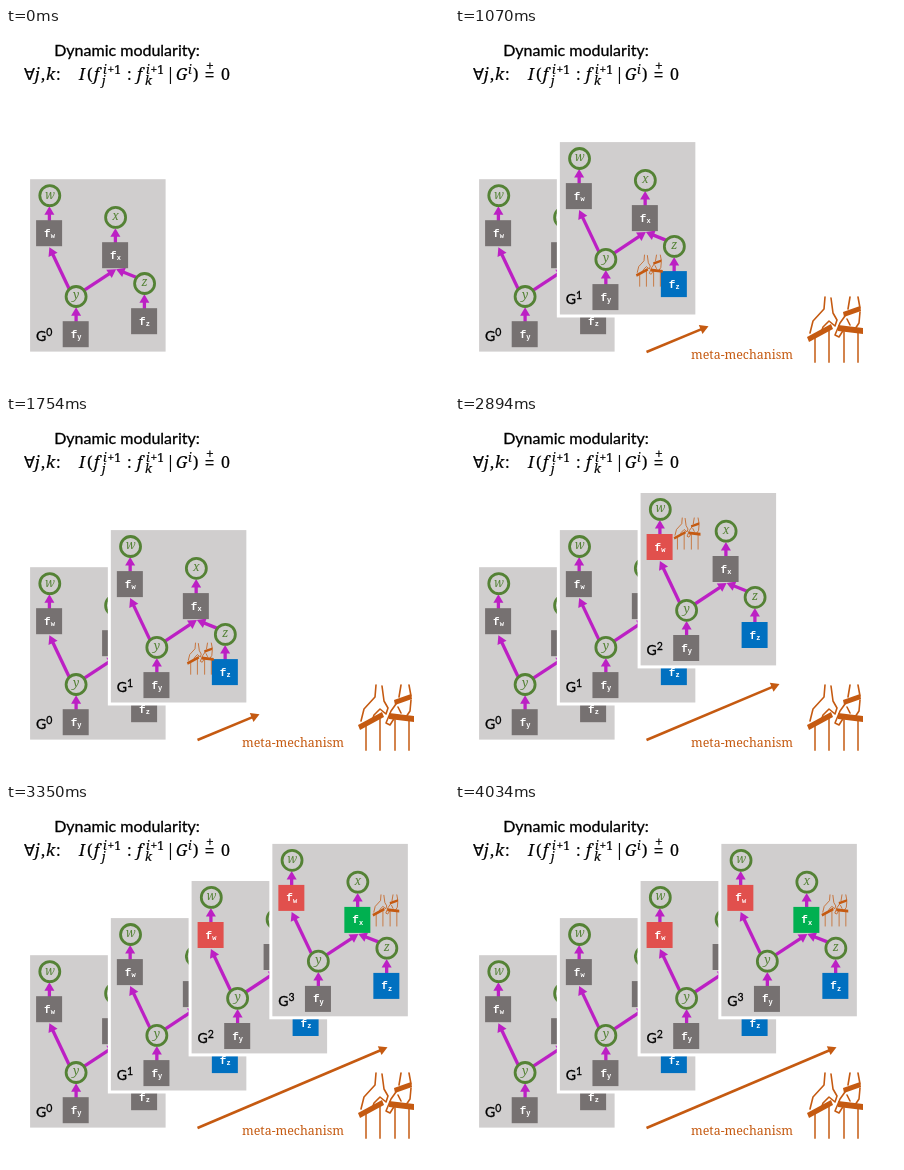
An HTML page that plays this animation: 443 by 360 pixels, repeating every 4490 ms.

```html
<!DOCTYPE html>
<html lang="en">
<head>
<meta charset="utf-8">
<title>Dynamic modularity</title>
<style>
  html, body { margin: 0; width: 100%; height: 100%; overflow: hidden; background: #fff; }
  svg { display: block; width: 100%; height: 100%; }
  .sans { font-family: Lato, "Open Sans", sans-serif; stroke: #000; stroke-width: .3px; }
  .math { font-family: "Noto Serif", "DejaVu Sans", serif; stroke: #000; stroke-width: .2px; }
  .it { font-style: italic; }
  .node { font: italic 12px "Noto Serif", serif; fill: #548235; text-anchor: middle; }
  .mono { font-family: "Liberation Mono", monospace; font-weight: bold; fill: #fff; }
  .meta { font-family: "Noto Serif", serif; font-size: 12.4px; fill: #c55a11; }
</style>
</head>
<body>
<svg id="stage" viewBox="0 0 443 360" xmlns="http://www.w3.org/2000/svg">
  <defs>
    <g id="hands" fill="none" stroke="#c55a11" stroke-width="1.6" stroke-linejoin="round" stroke-linecap="round">
      <path d="M8 43V67M22 36V67M37 37V67M51 38V67" stroke-width="2" opacity=".75"/>
      <g fill="#c55a11" stroke="none">
        <path d="M0 42L24 29L26 34L2 47Z"/>
        <path d="M31 30L56 33V39L31 36Z"/>
        <path d="M36 17L53 11L54 16L37 22Z"/>
      </g>
      <path d="M18 2L17 14L6 26L3 38M24 3L26 18L30 25L28 31L22 26L16 32L14 38"/>
      <path d="M43 2L41 14M51 2L53 13M38 21L33 28L28 40L32 42L37 34M53 17L52 28L48 34M40 24L43 30"/>
    </g>
  </defs>
  <rect width="443" height="360" fill="#fff"/>
  <text class="sans" x="121" y="28" font-size="16" text-anchor="middle">Dynamic modularity:</text>
  <g id="formula" class="math"></g>
  <g id="panels"></g>
  <g id="mechanism">
    <g id="arrow"></g>
    <text class="meta" x="236" y="330.5">meta-mechanism</text>
    <use href="#hands" x="352" y="267"/>
  </g>
</svg>
<script>
const $ = id => document.getElementById(id);
const MAGENTA = "#bc20c4", ORANGE = "#c55a11";
const GREY = "#767171", BLUE = "#0070c0", RED = "#e1504d", GREEN = "#00b050";

// Formula pieces: text, x, baseline, size, italic
const BASE = 52, SIZE = 16, SMALL = 12;
const main = (s, x, it) => [s, x, BASE, SIZE, it];
const factor = (x, sub) => [
  main("f", x, 1), ["i", x + 9, 46, SMALL, 1], ["+1", x + 13.5, 46, SMALL, 0], [sub, x + 8, 57, SMALL, 1]
];
const pieces = [
  main("∀", 18), main("j", 29, 1), main(",", 35), main("k", 40, 1), main(":", 50),
  main("I", 73, 1), main("(", 81), ...factor(88, "j"), main(":", 121), ...factor(131, "k"),
  main("|", 160), main("G", 170, 1), ["i", 182, 46, SMALL, 1], main(")", 187),
  ["=", 198.5, 53, 18, 0], ["+", 200, 43, 14, 0], main("0", 215)
];
$("formula").innerHTML = pieces.map(([s, x, y, size, it]) =>
  `<text x="${x}" y="${y}" font-size="${size}"${it ? ' class="it"' : ""}>${s}</text>`).join("");

function arrow(x1, y1, x2, y2, color, width, len, half) {
  const d = Math.hypot(x2 - x1, y2 - y1), ux = (x2 - x1) / d, uy = (y2 - y1) / d;
  const bx = x2 - ux * len, by = y2 - uy * len;
  return `<path d="M${x1} ${y1}L${bx + ux} ${by + uy}" stroke="${color}" stroke-width="${width}"/>` +
    `<path d="M${x2} ${y2}L${bx - uy * half} ${by + ux * half}L${bx + uy * half} ${by - ux * half}Z" fill="${color}"/>`;
}

// Coordinates below are relative to a panel's top left corner.
const nodes = { w: [19.7, 16.4], x: [85.5, 38.2], z: [114.5, 104.3], y: [46, 117.3] };
const boxes = { w: [6, 41], x: [72, 63], z: [101, 129], y: [32.6, 142] };
const edges = [
  [19.3, 42, 19.3, 27], [85.3, 64, 85.3, 49], [114.3, 130, 114.3, 115], [46, 143, 46, 128],
  [39, 109.5, 19.3, 68], [53.5, 111.5, 86, 90], [106, 98, 86, 90]
];
const panels = [
  { colors: {} },
  { colors: { z: BLUE }, hands: [76, 112] },
  { colors: { z: BLUE, w: RED }, hands: [33, 24] },
  { colors: { z: BLUE, w: RED, x: GREEN }, hands: [100, 50] }
];

function panel({ colors, hands }, i) {
  let s = `<g id="panel${i}" transform="translate(${24.1 + 80.75 * i} ${151.2 - 37.1 * i})">`;
  s += `<rect x="-3" y="-3" width="141.5" height="178.4" fill="#fff"/><rect width="135.5" height="172.4" fill="#d0cece"/>`;
  s += edges.map(e => arrow(...e, MAGENTA, 3.3, 8.5, 5)).join("");
  for (const k in nodes) {
    const [x, y] = nodes[k];
    s += `<circle cx="${x}" cy="${y}" r="10" fill="#d0cece" stroke="#548235" stroke-width="2.8"/>` +
      `<text class="node" x="${x}" y="${y + 3}">${k}</text>`;
  }
  for (const k in boxes) {
    const [x, y] = boxes[k];
    s += `<rect x="${x}" y="${y}" width="26" height="26" fill="${colors[k] || GREY}"/>` +
      `<text class="mono" x="${x + 8}" y="${y + 16.5}" font-size="11">f<tspan font-size="7" dy="1.5">${k}</tspan></text>`;
  }
  s += `<text class="sans" x="6" y="162" font-size="14">G<tspan font-size="10.5" dy="-5">${i}</tspan></text>`;
  if (hands) s += `<use id="hands${i}" href="#hands" transform="translate(${hands}) scale(.48)"/>`;
  return s + "</g>";
}
$("panels").innerHTML = panels.map(panel).join("");

const LOOP = 4490, starts = [0, 1070, 2210, 3350];
const tips = [null, [253.5, 298.3], [324.5, 268], [381.5, 243.3]];
const show = (id, on) => $(id).setAttribute("display", on ? "inline" : "none");
let current = -1;

function render(ms) {
  const t = ms % LOOP;
  const step = starts.filter(s => s <= t).length - 1;
  if (step === current) return;
  current = step;
  panels.forEach((p, i) => {
    show("panel" + i, i <= step);
    if (p.hands) show("hands" + i, i === step);
  });
  show("mechanism", step > 0);
  if (step > 0) $("arrow").innerHTML = arrow(191.5, 324, ...tips[step], ORANGE, 2.6, 8.5, 4.8);
}

const t0 = performance.now();
function tick() {
  render(performance.now() - t0);
  requestAnimationFrame(tick);
}
tick();
</script>
</body>
</html>
```
